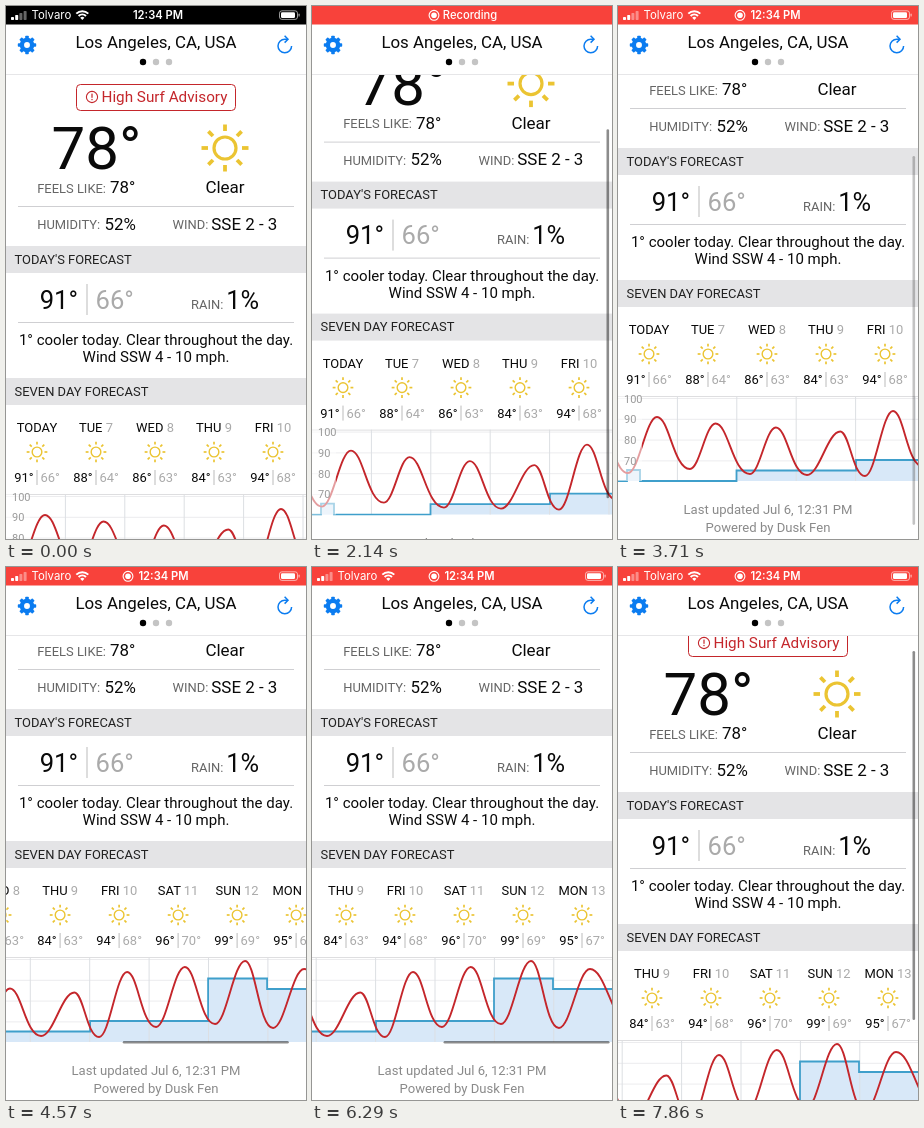
Animation, 300 px wide and 533 px high, one loop 8000 ms. Source, as an HTML page:

```html
<!DOCTYPE html>
<html lang="en">
<head>
<meta charset="utf-8">
<title>Weather</title>
<style>
  html, body { margin: 0; width: 100%; height: 100%; overflow: hidden; background: #fff; }
  svg { display: block; width: 300px; height: 533px; font-family: Roboto, sans-serif; }
  .system { font-family: Inter, sans-serif; }
</style>
</head>
<body>
<svg id="stage" viewBox="0 0 300 533"></svg>
<script>
const INK = '#0a0a0a', LABEL = '#666', PALE = '#aaa', RULE = '#cfcfd2';
const RED = '#c4262b', BLUE = '#0b7cf0', SUN = '#ebc432';
const LOOP = 8000, FPS = 7, COLUMN = 59, CHART_WIDTH = 474, MAX_X = 174, SMALL = 12.95;

const text = (x, y, str, size, fill = INK, anchor = 'start', extra = '') =>
  `<text x="${x}" y="${y}" font-size="${size}" fill="${fill}" text-anchor="${anchor}" ${extra}>${str}</text>`;
const rect = (x, y, w, h, fill, extra = '') =>
  `<rect x="${x}" y="${y}" width="${w}" height="${h}" fill="${fill}" ${extra}/>`;
const circle = (x, y, r, fill, extra = '') =>
  `<circle cx="${x}" cy="${y}" r="${r}" fill="${fill}" ${extra}/>`;
const path = (d, stroke, width, extra = '') =>
  `<path d="${d}" fill="none" stroke="${stroke}" stroke-width="${width}" ${extra}/>`;
const group = (body, extra = '') => `<g ${extra}>${body}</g>`;
const times = (n, fn) => Array.from({ length: n }, (_, i) => fn(i)).join('');

function sun(x, y, scale) {
  const rays = times(8, i => path('M0 -17V-23.5', SUN, 3.8, `transform="rotate(${i * 45})"`));
  return group(circle(0, 0, 11, 'none', `stroke="${SUN}" stroke-width="3.2"`) + rays,
    `transform="translate(${x} ${y}) scale(${scale})"`);
}

function gear(x, y) {
  const teeth = times(8, i => rect(-1.8, -9.2, 3.6, 4, BLUE, `rx=".8" transform="rotate(${i * 45})"`));
  return group(circle(0, 0, 5.1, 'none', `stroke="${BLUE}" stroke-width="4.3"`) + teeth,
    `transform="translate(${x} ${y})"`);
}

// Smooth wave through alternating lows and highs; lows are broader when falling into them.
function wave(points) {
  return points.map(([x, y], i) => {
    if (!i) return `M${x} ${y}`;
    const [px, py] = points[i - 1], w = x - px;
    const ease = y > py ? 0.5 : 0.38;
    return `C${px + w * 0.37} ${py} ${x - w * ease} ${y} ${x} ${y}`;
  }).join('');
}

function chart() {
  const temps = [[-12, 50], [10, 77], [39, 21], [72, 73], [97.5, 27.5], [132, 78], [157.8, 31.5],
    [189, 79], [222.3, 35.5], [247, 80], [275, 15], [304, 70], [332.7, 10], [363, 67], [393, 4],
    [421, 71], [452, 12], [497, 72]];
  const rain = 'M0 85H9V74H22V85H118.5V74.5H238V64H356V21.5H415V32H474';
  const level = i => 2.5 + i * 20.8;
  return rect(0, 0, CHART_WIDTH, 85, '#fff')
    + times(4, i => path(`M0 ${level(i)}H${CHART_WIDTH}`, '#ececee', 1))
    + `<path d="${rain}V85H0Z" fill="#d8e8f8"/>`
    + times(7, i => path(`M${(i + 1) * 59.4} 0V85`, '#dcdfe3', 1))
    + path(rain, '#3f9fcb', 1.8)
    + path(wave(temps), RED, 1.9)
    + path(`M0 .5H${CHART_WIDTH}`, '#dedee0', 1)
    + rect(0, 0, 24, 85, '#fff', 'opacity=".55"')
    + times(4, i => text(6, level(i) + 4, 100 - i * 10, 11, '#999'));
}

function days() {
  const week = [['TODAY', '', 91, 66], ['TUE', 7, 88, 64], ['WED', 8, 86, 63], ['THU', 9, 84, 63],
    ['FRI', 10, 94, 68], ['SAT', 11, 96, 70], ['SUN', 12, 99, 69], ['MON', 13, 95, 67]];
  return week.map(([name, date, high, low], i) => {
    const x = 31 + i * COLUMN;
    const label = date ? `${name} <tspan fill="${PALE}">${date}</tspan>` : name;
    return text(x, 426, label, SMALL, INK, 'middle') + sun(x, 446, 0.44)
      + text(x - 3.5, 476, high + '°', SMALL, INK, 'end')
      + rect(x - 0.5, 464, 1, 15, '#bbb')
      + text(x + 3.5, 476, low + '°', SMALL, PALE);
  }).join('');
}

const heading = (y, str) => rect(0, y, 300, 27, '#e4e4e6') + text(8.5, y + 17.6, str, SMALL, '#222');
const rule = y => rect(12, y, 276, 1, RULE);

const page = rect(70.5, 78.5, 159, 26, '#fff', `rx="4" stroke="${RED}"`)
  + circle(86, 91, 5.6, 'none', `stroke="${RED}" stroke-width="1.1"`)
  + rect(85.4, 87.6, 1.2, 4.2, RED) + rect(85.4, 92.9, 1.2, 1.3, RED)
  + text(95.5, 96.4, 'High Surf Advisory', 15.25, RED)
  + text(45.5, 163, '78°', 60) + sun(219, 142, 1)
  + text(31.2, 186.6, 'FEELS LIKE:', SMALL, LABEL) + text(104, 187, '78°', 16.9)
  + text(219, 187, 'Clear', 17, INK, 'middle')
  + rule(200)
  + text(31.2, 223, 'HUMIDITY:', SMALL, LABEL) + text(98.5, 223.5, '52%', 16.9)
  + text(166.5, 223, 'WIND:', SMALL, LABEL) + text(205.3, 223.5, 'SSE 2 - 3', 16.95)
  + heading(240, 'TODAY\'S FORECAST')
  + text(33.7, 302.5, '91°', 25.6) + rect(80.5, 278, 1, 31, '#bbb') + text(89.5, 302.5, '66°', 25.6, PALE)
  + text(185, 302.5, 'RAIN:', SMALL, LABEL) + text(220.3, 302.5, '1%', 25.4)
  + rule(316)
  + text(150, 339, '1° cooler today. Clear throughout the day.', 15.02, INK, 'middle')
  + text(150, 356, 'Wind SSW 4 - 10 mph.', 15.02, INK, 'middle')
  + heading(372, 'SEVEN DAY FORECAST')
  + group(days() + group(chart(), 'transform="translate(0 488)" clip-path="url(#chartClip)"'), 'id="week"')
  + rect(0, 572, 0, 2.6, '#000', 'id="barX" rx="1.3"')
  + text(150, 606, 'Last updated Jul 6, 12:31 PM', 13.1, '#8a8a8a', 'middle')
  + text(150, 624, 'Powered by Dusk Fen', 13.1, '#8a8a8a', 'middle');

const nav = rect(0, 0, 300, 69, '#fff') + rect(0, 68, 300, 1, '#e6e6e8')
  + gear(21, 39)
  + text(150, 42, 'Los Angeles, CA, USA', 16.9, INK, 'middle')
  + [137, 150, 163].map((x, i) => circle(x, 56, 3.2, i ? '#c4c4c4' : '#000')).join('')
  + path('M285.6 40A6.8 6.8 0 1 1 278.8 33.2H281.6', BLUE, 1.5)
  + path('M278.6 29.8L282 33.2L278.6 36.6', BLUE, 1.5);

const carrier = times(4, i => rect(5 + i * 4.2, 11 - i * 2, 3, 3 + i * 2, '#fff', `rx=".7" opacity="${i < 2 ? 1 : 0.4}"`))
  + text(25.5, 13.2, 'Tolvaro', 11.4, '#fff')
  + path('M70.3 7.6A8.6 8.6 0 0 1 82.3 7.6M72.6 10A5.4 5.4 0 0 1 80 10', '#fff', 2)
  + '<path d="M76.3 14L74.2 11.7A3 3 0 0 1 78.4 11.7Z" fill="#fff"/>'
  + rect(273.5, 4.8, 18, 8.6, 'none', 'rx="2.4" stroke="#fff" stroke-opacity=".6"')
  + rect(275, 6.3, 14, 5.6, '#fff', 'rx="1.2"') + rect(292.5, 7.6, 1.2, 3, '#fff', 'rx=".6" opacity=".6"');
const recordDot = circle(122, 9.3, 4.9, 'none', 'stroke="#fff" stroke-width="1.1"') + circle(122, 9.3, 2.8, '#fff');

const status = rect(0, 0, 300, 18.5, '#000', 'id="statusBack"')
  + group(carrier, 'id="carrier"')
  + group(recordDot, 'id="recordDot"')
  + text(152, 13.3, '12:34 PM', 11.2, '#fff', 'middle', 'id="clock" font-weight="600"')
  + text(158, 13.3, 'Recording', 11.2, '#fff', 'middle', 'id="recording" font-weight="500"');

const $ = id => document.getElementById(id);
$('stage').innerHTML =
  `<defs><clipPath id="chartClip"><rect y="-8" width="${CHART_WIDTH}" height="94"/></clipPath></defs>`
  + rect(0, 0, 300, 533, '#fff') + group(page, 'id="page"')
  + rect(294.5, 0, 2.6, 369, '#000', 'id="barY" rx="1.3"')
  + nav + group(status, 'class="system"');

// Tracks of [time, value], joined by straight lines.
const scrollY = [[1430, 0], [1720, 16], [2000, 49], [2140, 64], [2430, 84], [2720, 94], [3140, 98],
  [7140, 98], [7290, 88], [7570, 50], [7715, 28], [7860, 15]];
const scrollX = [[3860, 0], [4140, 46], [4430, 128], [4720, 180], [5000, 202], [5140, 204],
  [5290, 199], [5570, 182], [5860, 174]];
const showY = [[1430, 0], [1500, 1], [3550, 1], [3900, 0], [7140, 0], [7200, 1]];
const showX = [[3860, 0], [3930, 1], [6400, 1], [6750, 0]];

function valueAt(track, t) {
  const next = track.findIndex(([time]) => time > t);
  if (next === 0) return track[0][1];
  if (next < 0) return track[track.length - 1][1];
  const [t0, v0] = track[next - 1], [t1, v1] = track[next];
  return v0 + (v1 - v0) * (t - t0) / (t1 - t0);
}

// The recording bar darkens gently every two seconds.
function recordRed(t) {
  const dim = Math.max(0, Math.cos((t - 5140) / 1000 * Math.PI));
  return `rgb(${248 - 34 * dim}, ${66 - 8 * dim}, ${59 - 8 * dim})`;
}

const set = (id, values) => Object.entries(values).forEach(([key, value]) => $(id).setAttribute(key, value));
const show = (id, visible) => set(id, { visibility: visible ? 'visible' : 'hidden' });

function draw(elapsed) {
  const step = Math.floor((elapsed % LOOP + 5) * FPS / 1000) % (LOOP * FPS / 1000);
  const t = step * 1000 / FPS + 3;
  const y = valueAt(scrollY, t), x = valueAt(scrollX, t);
  set('page', { transform: `translate(0 ${-y})` });
  set('week', { transform: `translate(${-x} 0)` });
  set('barY', { y: 72 + y * 0.795, opacity: 0.45 * valueAt(showY, t) });
  const left = 3.5 + Math.min(x, MAX_X) * 0.736 + Math.max(0, x - MAX_X);
  set('barX', { x: left, width: Math.min(166, 297.5 - left), opacity: 0.45 * valueAt(showX, t) });

  const red = t > 500, banner = red && t < 2900;
  set('statusBack', { fill: !red ? '#000' : banner ? '#f8423b' : recordRed(t) });
  set('clock', { x: red ? 157.5 : 152 });
  show('carrier', !banner);
  show('clock', !banner);
  show('recording', banner);
  show('recordDot', red);
}

const start = performance.now();
function tick() {
  draw(performance.now() - start);
  requestAnimationFrame(tick);
}
tick();
</script>
</body>
</html>
```
